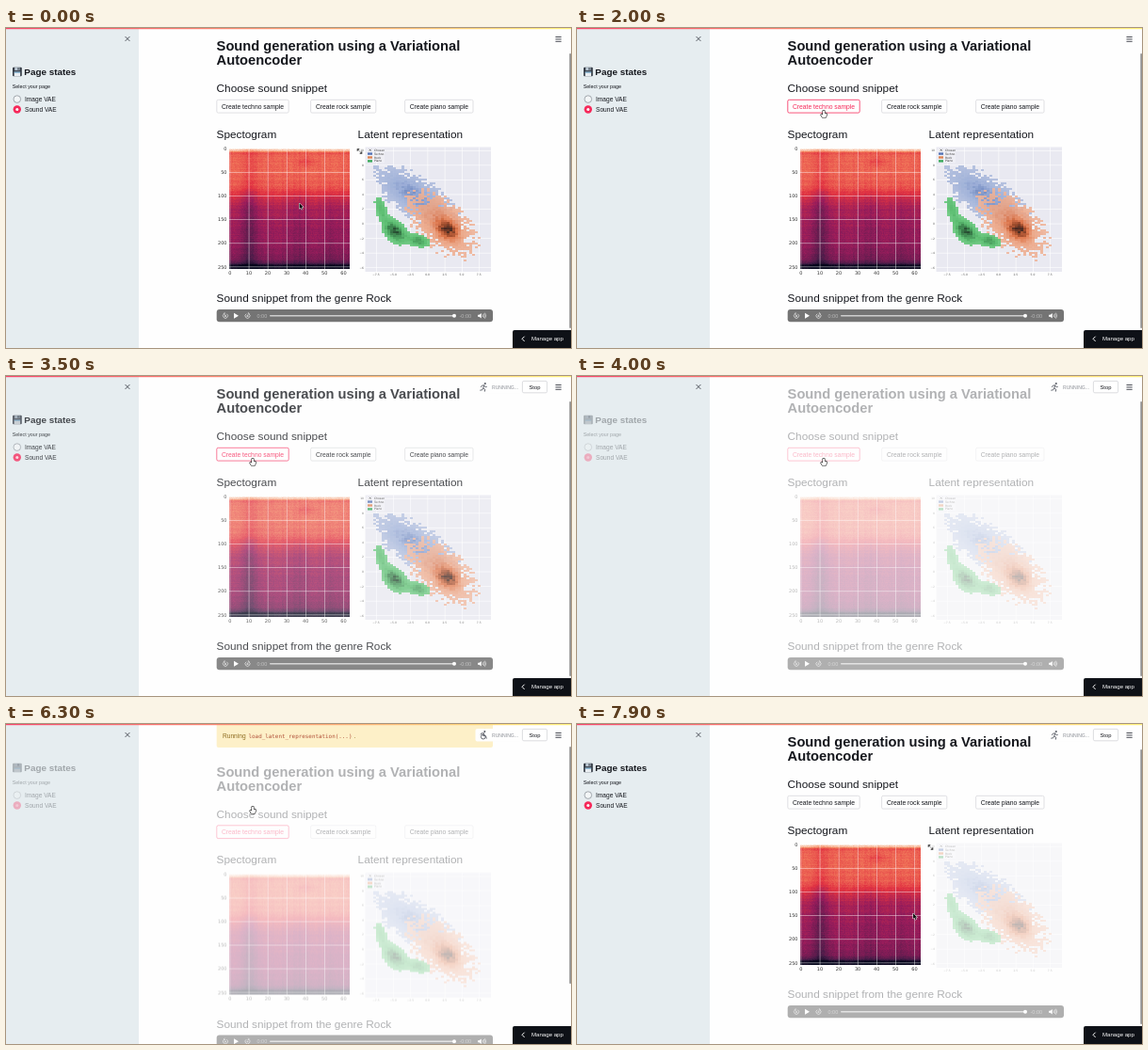
Recreate the animation shown at these times as an HTML page with a canvas. Size 600 by 340 pixels, loop 8 s.

```html
<!DOCTYPE html>
<html lang="en">
<head>
<meta charset="utf-8">
<title>Sound generation app</title>
<style>
html, body { margin: 0; width: 100%; height: 100%; overflow: hidden; background: #fefefe; }
canvas { display: block; }
</style>
</head>
<body>
<canvas id="stage" width="600" height="340"></canvas>
<script>
const LOOP = 8000, RUN = 2300, FADE = 2950, SHIFT = 5900, BACK = 6700, REDRAW = 7400;
const INK = '#15171d', RED = '#f6295a', PAGE = '#fefefe', SIDE = '#e6edf0';
const SANS = '"Liberation Sans", Arial, sans-serif';
const PLOT = '"DejaVu Sans", sans-serif';
const MONO = '"DejaVu Sans Mono", monospace';
const stage = document.getElementById('stage').getContext('2d');
let g = stage;

const clamp = v => Math.min(1, Math.max(0, v));
const mix = (a, b, p) => a + (b - a) * p;
const smooth = p => p * p * (3 - 2 * p);
const bell = (v, mid, sd) => Math.exp(-(((v - mid) / sd) ** 2) / 2);

function seeded(seed) {
  return () => (seed = (seed * 16807) % 2147483647) / 2147483647;
}

function ramp(stops, v) {
  const pos = clamp(v) * (stops.length - 1), i = Math.min(Math.floor(pos), stops.length - 2);
  return `rgb(${stops[i].map((c, k) => Math.round(mix(c, stops[i + 1][k], pos - i)))})`;
}

function curve(points, v) {
  const i = Math.max(1, points.findIndex(p => p[0] >= v));
  const [a, b] = [points[i - 1], points[i]];
  return mix(a[1], b[1], (v - a[0]) / (b[0] - a[0]));
}

function text(s, x, y, size, color = INK, { weight = 400, family = SANS, align = 'left' } = {}) {
  g.font = `${weight} ${size}px ${family}`;
  g.textAlign = align;
  g.fillStyle = color;
  g.fillText(s, x, y);
}

function rect(x, y, w, h, color) {
  g.fillStyle = color;
  g.fillRect(x, y, w, h);
}

function box(x, y, w, h, r, fill, stroke) {
  g.beginPath();
  g.roundRect(x, y, w, h, r);
  if (fill) { g.fillStyle = fill; g.fill(); }
  if (stroke) { g.strokeStyle = stroke; g.lineWidth = 0.8; g.stroke(); }
}

function disc(x, y, r, fill, stroke, width = 0.8) {
  g.beginPath();
  g.arc(x, y, r, 0, 7);
  if (fill) { g.fillStyle = fill; g.fill(); }
  if (stroke) { g.strokeStyle = stroke; g.lineWidth = width; g.stroke(); }
}

function shape(d, { x = 0, y = 0, fill, stroke, width = 1 }) {
  const path = new Path2D(d);
  g.save();
  g.translate(x, y);
  if (stroke) { g.strokeStyle = stroke; g.lineWidth = width; g.stroke(path); }
  if (fill) { g.fillStyle = fill; g.fill(path); }
  g.restore();
}

function layer(draw) {
  const c = document.createElement('canvas');
  c.width = 600;
  c.height = 340;
  g = c.getContext('2d');
  draw();
  g = stage;
  return c;
}

function drawSpectrogram() {
  const rocket = [[3, 5, 26], [69, 28, 71], [151, 28, 91], [225, 51, 66], [245, 137, 96], [250, 235, 221]];
  const levels = [[0, .97], [.015, .9], [.03, .68], [.08, .72], [.3, .7], [.4, .56], [.5, .45],
    [.75, .4], [.92, .34], [.95, .22], [.965, .05], [1, .02]];
  const rnd = seeded(41);
  const columns = Array.from({ length: 64 }, () => rnd() - .5);
  const rows = Array.from({ length: 128 }, () => rnd() - .5);
  for (let y = 0; y < 128; y++) {
    for (let x = 0; x < 128; x++) {
      const u = x / 128, f = y / 128, deep = clamp((f - .25) * 6);
      const v = curve(levels, f)
        - bell(u, .16, .05) * (.05 + .07 * deep)
        - (bell(u, .58, .07) + bell(u, .85, .05)) * .04 * deep
        - bell(u, .63, .05) * bell(f, .11, .025) * .07
        + columns[x >> 1] * .03 + rows[y] * .035 + (rnd() - .5) * .05;
      rect(237 + x, 128 + y, 1, 1, ramp(rocket, v));
    }
  }
  for (let i = 0; i < 7; i++) {
    rect(237.6 + i * 20.1, 128, .7, 128, 'rgba(255,255,255,.6)');
    text(i * 10, 237.8 + i * 20.1, 262.3, 5, '#333', { family: PLOT, align: 'center' });
  }
  for (let i = 0; i < 6; i++) {
    rect(237, 128 + i * 25.1, 128, .7, 'rgba(255,255,255,.6)');
    text(i * 50, 234.5, 130 + i * 25.1, 5, '#333', { family: PLOT, align: 'right' });
  }
}

// Each lobe: centre x, centre y, angle, long spread, short spread, weight
const clusters = [
  { colors: [[178, 191, 222], [150, 170, 214], [85, 115, 180]], cut: .05, rough: .28,
    lobes: [[434, 178, .58, 25, 10, .8]] },
  { colors: [[240, 188, 164], [236, 158, 122], [222, 105, 55], [150, 55, 18], [55, 20, 8]], cut: .05, rough: .2,
    lobes: [[463, 209, .74, 25, 14, .36], [469, 214, .75, 8, 6, .64]] },
  { colors: [[115, 208, 135], [75, 185, 98], [40, 125, 60], [8, 45, 18]], cut: .1, rough: .06,
    lobes: [[398, 192, 1.25, 8.5, 3.5, .4], [413, 216, .8, 9, 5.5, .9], [438, 226, .3, 7, 4, .6]] }
];

function density(x, y, lobes) {
  return lobes.reduce((sum, [cx, cy, a, long, short, w]) => {
    const dx = x - cx, dy = y - cy, c = Math.cos(a), s = Math.sin(a);
    return sum + w * bell(dx * c + dy * s, 0, long) * bell(dy * c - dx * s, 0, short);
  }, 0);
}

function drawLatent() {
  const small = { family: PLOT, align: 'center' };
  rect(381.5, 126.5, 133.5, 132.5, '#e9e9f1');
  for (let i = 0; i < 7; i++) {
    const x = 393 + i * 18.2;
    rect(x, 126.5, .6, 132.5, '#fff');
    text((i * 2.5 - 7.5).toFixed(1).replace('-', '−'), x, 263, 3, '#555', small);
  }
  for (let i = 0; i < 9; i++) {
    const y = 130 + i * 15.55;
    rect(381.5, y, 133.5, .6, '#fff');
    text(String(10 - i * 2).replace('-', '−'), 380, y + 1.2, 3, '#555', { family: PLOT, align: 'right' });
  }
  const rnd = seeded(977);
  for (const { colors, cut, rough, lobes } of clusters) {
    g.globalAlpha = .88;
    for (let y = 146; y < 258; y += 2) {
      for (let x = 390; x < 512; x += 3) {
        const d = density(x + 1.5, y + 1, lobes), n = rnd();
        if (d > cut + rough * n * n) rect(x, y, 3, 2, ramp(colors, d * (.8 + rnd() * .35)));
      }
    }
  }
  g.globalAlpha = 1;
  box(383, 127.5, 19, 16, 1, 'rgba(240,240,246,.85)');
  shape('M-1-1L1 1M1-1L-1 1', { x: 386.7, y: 129.7, stroke: '#333', width: .6 });
  ['Chosen', 'Techno', 'Rock', 'Piano'].forEach((name, i) => {
    const y = 129.7 + i * 3.9;
    if (i) rect(384, y - 1.2, 5, 2.4, ['', '#5674b5', '#dd8452', '#38a95a'][i]);
    text(name, 391, y + 1, 3, '#333', { family: PLOT });
  });
}

const spectrogram = layer(drawSpectrogram), latent = layer(drawLatent);

function staleness(t, until) {
  return t >= until ? 1 : 1 - .67 * clamp((t - FADE) / 1000) ** 1.8;
}

function pointer(t) {
  if (t < 1400) {
    const p = smooth(clamp((t - 150) / 950));
    return [mix(311.5, 262, p), mix(186, 99.5, p)];
  }
  if (t < 7000) return [262, mix(99.5, 88, smooth(clamp((t - 1400) / 300)))];
  const p = smooth(clamp((t - 7000) / 800));
  return [mix(262, 357, p), mix(88, 201, p)];
}

function button(label, x, w, color, edge) {
  box(x, 76.3, w, 13.8, 1.5, null, edge);
  text(label, x + w / 2, 85.8, 6.75, color, { align: 'center' });
}

function drawPlayer(alpha) {
  g.globalAlpha = alpha;
  box(223.7, 299, 293.3, 13.2, 3, '#747474');
  g.globalAlpha = 1;
  for (const [x, flip] of [[233, 1], [256.5, -1]]) {
    g.save();
    g.translate(x, 305.8);
    g.scale(flip, 1);
    shape('M-1.3-2.1A2.5 2.5 0 1 0 1.3-2.1M-.6-3.6L-1.8-2.2L0-1.5', { stroke: '#eee', width: .7 });
    rect(-.9, -.6, 1.8, 1.6, '#ddd');
    g.restore();
  }
  shape('M-2-3L3 0L-2 3Z', { x: 244, y: 305.7, fill: '#fff' });
  const dim = 'rgba(255,255,255,.5)';
  text('0:00', 266.5, 307.8, 5.5, dim);
  text('-0:00', 481.5, 307.8, 5.5, dim);
  box(280, 305, 196, 1.5, .7, 'rgba(255,255,255,.65)');
  disc(476, 305.7, 2, '#fff');
  shape('M-4-1H-2.5L-.3-2.8V2.8L-2.5 1H-4Z', { x: 505, y: 305.7, fill: '#fff' });
  shape('M1-1.3Q2 0 1 1.3M2.3-2.2Q4 0 2.3 2.2M3.5-3Q5.8 0 3.5 3', { x: 505, y: 305.7, stroke: '#fff', width: .6 });
}

function drawMain(t, x, y) {
  const fresh = staleness(t, BACK), old = staleness(t, LOOP);
  const hot = t >= 1600 && t < 7100;
  const heading = (s, x, y) => text(s, x, y, 11.8);
  g.save();
  if (t >= SHIFT && t < BACK) {
    box(223.7, -6, 293.3, 31, 2, '#fdf0c8');
    text('Running', 230, 15.3, 6.6, '#8d6b1f');
    text('load_latent_representation(...)', 257.5, 15.2, 5.9, '#b04f38', { family: MONO });
    text('.', 369.5, 15.3, 6.6, '#8d6b1f');
    g.translate(0, 31.5);
  }
  g.globalAlpha = fresh;
  text('Sound generation using a Variational', 223.6, 24.2, 14.7, INK, { weight: 700 });
  text('Autoencoder', 223.6, 39.3, 14.7, INK, { weight: 700 });
  heading('Choose sound snippet', 223.6, 68);
  heading('Spectogram', 223.6, 116.8);
  heading('Latent representation', 373.6, 116.8);
  button('Create techno sample', 223.8, 76.4, hot ? RED : INK, hot ? RED : '#d8d9dc');
  button('Create rock sample', 323.6, 69.2, INK, '#d8d9dc');
  button('Create piano sample', 423.6, 72.4, INK, '#d8d9dc');
  g.globalAlpha = staleness(t, REDRAW);
  g.drawImage(spectrogram, 0, 0);
  g.globalAlpha = old;
  g.drawImage(latent, 0, 0);
  heading('Sound snippet from the genre Rock', 223.6, 291);
  drawPlayer(mix(1, old, .65));
  g.restore();

  if (y > 126 && y < 262) {
    shape('M-2.3-.2V-2.3H-.2M.2 2.3H2.3V.2M-2.3-2.3L-.5-.5M2.3 2.3L.5.5', { x: 375.5, y: 131, stroke: '#222', width: .9 });
  }
  if (y > 95 && y < 125 && t < 1600) {
    shape('M-.3-1.2L1-2.4A1.5 1.5 0 0 1 3-.5L1.6.9A1.5 1.5 0 0 1-.5.8M.3 1.2L-1 2.4A1.5 1.5 0 0 1-3 .5L-1.6-.9A1.5 1.5 0 0 1 .5-.8',
      { x: 212, y: 112.5, stroke: '#a5a7ad', width: .8 });
  }
}

function drawSidebar(t) {
  rect(0, 0, 141, 340, SIDE);
  shape('M-2.4-2.4L2.4 2.4M2.4-2.4L-2.4 2.4', { x: 129, y: 11.5, stroke: '#50545c', width: 1 });
  g.globalAlpha = staleness(t, BACK);
  box(7, 41.7, 9.8, 9.6, 1, '#353c46');
  rect(9.2, 41.9, 5.3, 3.2, '#b9c6d2');
  rect(12.4, 42.3, 1.2, 2.3, '#353c46');
  rect(8.7, 46.6, 6.4, 4.6, '#e9eef2');
  rect(8.7, 46.6, 6.4, 1, '#5c9bc4');
  text('Page states', 19.3, 50.3, 9.9, INK, { weight: 700 });
  text('Select your page', 6.8, 64.4, 5.35);
  disc(11.8, 75.6, 3.8, '#f3f6f7', '#8f959c');
  text('Image VAE', 20, 78, 6.6);
  disc(11.8, 86.5, 4.2, RED);
  disc(11.8, 86.5, 1.5, '#fff');
  text('Sound VAE', 20, 88.9, 6.6);
  g.globalAlpha = 1;
}

function drawStatus(t) {
  box(498.5, 5, 50, 13.5, 2, PAGE);
  const line = { x: 507.3, y: 12, stroke: '#555962', width: .9 };
  if (Math.floor((t - RUN) / 1000) % 2) {
    disc(508.8, 8, 1, '#555962');
    shape('M.6-2.4L-.6.8L1.4 2.2L1 4.6M-.6.8L-1.6 2.8L-4 3.2M.4-2.2L-2-1.8L-3-.2M.6-1.8L1.8-.2L3.4-.6', line);
  } else {
    disc(508.3, 8, 1, '#555962');
    disc(506.8, 13.6, 2.4, null, '#555962', .9);
    shape('M.4-2.6L-.6.4L2.2.8L3 3.6M.2-2L-2.4-2.2L-3.2-.6', line);
  }
  text('RUNNING...', 516, 14, 5.1, '#8b8e95');
  box(548.4, 5.4, 26.2, 12.4, 1.5, '#fff', '#d4d5d9');
  text('Stop', 561.4, 13.7, 5.8, INK, { align: 'center' });
}

function drawChrome(t) {
  const glow = g.createLinearGradient(0, 0, 600, 0);
  glow.addColorStop(0, '#f9466a');
  glow.addColorStop(1, '#fff27c');
  rect(0, 0, 600, 1.2, glow);
  if (t >= RUN) drawStatus(t);
  for (let i = 0; i < 3; i++) rect(583.5, 9 + i * 2.4, 6.2, 1, '#4a4d55');
  const shifted = t >= SHIFT && t < BACK;
  box(598.3, shifted ? 24 : 27, 1.7, shifted ? 252 : 292, .8, '#929292');
  box(538, 321, 64, 21, [2, 0, 0, 0], '#0e1117');
  shape('M1.3-2.6L-1.3 0L1.3 2.6', { x: 549.3, y: 330.3, stroke: '#fff', width: 1 });
  text('Manage app', 558, 332.4, 6.1, '#fff');
}

function drawPointer(t, x, y) {
  if (t >= 1600 && t < 7100) {
    shape('M-.9 0Q0-1 .9 0V2.4L3 3V5L2.2 7H-1.4L-3 4.4Q-2.8 3.2-.9 4.2Z', { x, y, fill: '#fff', stroke: '#111', width: 1.2 });
  } else {
    shape('M0 0V6L1.4 4.7L2.4 7L3.4 6.5L2.4 4.4H4.3Z', { x, y, fill: '#111', stroke: '#fff', width: 1 });
  }
}

function frame(now) {
  const t = now % LOOP, [x, y] = pointer(t);
  rect(0, 0, 600, 340, PAGE);
  drawMain(t, x, y);
  drawSidebar(t);
  drawChrome(t);
  drawPointer(t, x, y);
  requestAnimationFrame(frame);
}
requestAnimationFrame(frame);
</script>
</body>
</html>
```
